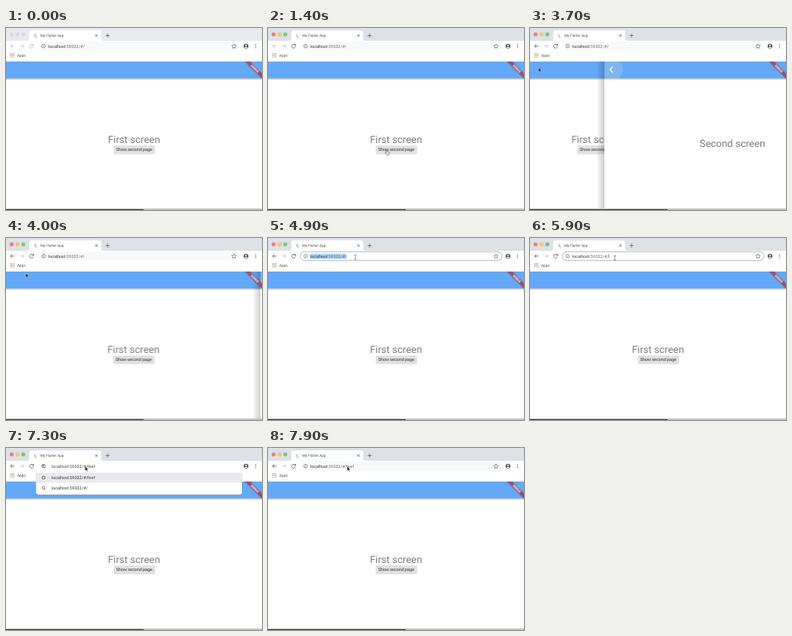
Animation, 320 px wide and 228 px high, one loop 8000 ms. Source, as an HTML page:

```html
<!DOCTYPE html>
<html lang="en">
<head>
<meta charset="utf-8">
<title>Browser navigation</title>
<style>
html, body { margin: 0; width: 100%; height: 100%; overflow: hidden; background: #fff; }
svg { display: block; width: 100vw; height: 100vh; }
text { font-family: Roboto, "Open Sans", sans-serif; font-size: 5.25px; fill: #333; white-space: pre; text-rendering: geometricPrecision; }
.small { font-size: 4.5px; fill: #4a4a4a; }
.big { font-size: 12.5px; fill: #7c7c7c; text-anchor: middle; }
.dim { fill: #686c70; }
.line { fill: none; stroke: #5f6368; stroke-width: .8; }
.thin { stroke-width: .6; }

/* Every part shares one 8 s clock; poses hold for 100 ms (1.25%). */
.strip, .lights, .back, .reload, .first, .second, .hover, .home, .detail, .typing, .done, .idle,
.ring, .sel, .caret, .popup, .pointer, .arrow, .hand, .beam, .spinA, .spinB, .k2, .k3, .k4 {
  animation: 8s step-end infinite;
}

.strip { animation-name: strip; }
@keyframes strip { 0% { fill: #e9eaee; } 13.75%, 100% { fill: #dee1e6; } }
.lights { animation-name: lights; }
@keyframes lights { 0% { opacity: 0; } 13.75%, 100% { opacity: 1; } }
.back { animation-name: back; }
@keyframes back { 0% { stroke: #c3c6c9; } 21.25%, 100% { stroke: #5f6368; } }
.reload { animation-name: reload; }
@keyframes reload { 0% { stroke: #b4b7ba; } 13.75%, 100% { stroke: #5f6368; } }

.home { animation-name: home; }
@keyframes home { 0%, 46.25% { opacity: 1; } 21.25%, 86.25%, 100% { opacity: 0; } }
.detail { animation-name: detail; }
@keyframes detail { 0%, 46.25%, 100% { opacity: 0; } 21.25% { opacity: 1; } }
.typing { animation-name: typing; }
@keyframes typing { 0%, 97.5%, 100% { opacity: 0; } 86.25% { opacity: 1; } }
.idle { animation-name: idle; }
@keyframes idle { 0%, 97.5%, 100% { opacity: 1; } 86.25% { opacity: 0; } }
.done { animation-name: done; }
@keyframes done { 0% { opacity: 0; } 97.5%, 100% { opacity: 1; } }
.k2 { animation-name: k2; }
@keyframes k2 { 0% { fill: transparent; } 88.75%, 100% { fill: #444; } }
.k3 { animation-name: k3; }
@keyframes k3 { 0% { fill: transparent; } 90%, 100% { fill: #444; } }
.k4 { animation-name: k4; }
@keyframes k4 { 0% { fill: transparent; } 91.25%, 100% { fill: #444; } }
.popup { animation-name: popup; }
@keyframes popup { 0%, 97.5%, 100% { opacity: 0; } 88.75% { opacity: 1; } }
.ring { animation-name: ring; }
@keyframes ring { 0%, 86.25%, 100% { opacity: 0; } 60% { opacity: 1; } }
.sel { animation-name: sel; }
@keyframes sel { 0%, 67.5%, 100% { opacity: 0; } 60% { opacity: 1; } }
.caret { animation-name: caret; }
@keyframes caret { 0%, 80%, 100% { opacity: 0; } 72.5% { opacity: 1; } }

/* Pushed page and the parallax of the page below it */
.second { animation-name: second; }
@keyframes second {
  0% { transform: translateX(345px); }
  21.25% { transform: translateX(2px); }
  22.5% { transform: translateX(1px); }
  23.75% { transform: none; }
  46.25% { transform: translateX(93px); }
  47.5% { transform: translateX(259px); }
  48.75% { transform: translateX(307px); }
  50% { transform: translateX(318px); }
  51.25%, 100% { transform: translateX(345px); }
}
.first { animation-name: first; }
@keyframes first {
  0% { transform: none; }
  21.25% { transform: translateX(-106.7px); }
  46.25% { transform: translateX(-75.7px); }
  47.5% { transform: translateX(-20.3px); }
  48.75% { transform: translateX(-4.3px); }
  50% { transform: translateX(-.7px); }
  51.25%, 100% { transform: none; }
}
.hover { animation-name: hover; }
@keyframes hover { 0% { opacity: 0; } 42.5%, 100% { opacity: .2; } }

.pointer { animation-name: pointer; }
@keyframes pointer {
  0% { transform: translate(-12px, 216px); }
  2.5% { transform: translate(1px, 216px); animation-timing-function: steps(7); }
  11.25% { transform: translate(155px, 150px); }
  12.5% { transform: translate(148px, 152.5px); }
  33.75% { transform: translate(148px, 152.5px); animation-timing-function: steps(8); }
  43.75% { transform: translate(10.7px, 49.5px); }
  48.75% { transform: translate(10.7px, 49.5px); animation-timing-function: steps(5); }
  55% { transform: translate(80px, 22px); animation-timing-function: steps(4); }
  60% { transform: translate(109.3px, 21px); }
  67.5% { transform: translate(109.3px, 21px); animation-timing-function: steps(2); }
  70% { transform: translate(113px, 21px); animation-timing-function: steps(6); }
  77.5%, 100% { transform: translate(99px, 23px); }
}
.arrow { animation-name: arrow; }
@keyframes arrow { 0%, 21.25%, 77.5%, 100% { opacity: 1; } 17.5%, 55% { opacity: 0; } }
.hand { animation-name: hand; }
@keyframes hand { 0%, 21.25%, 100% { opacity: 0; } 17.5% { opacity: 1; } }
.beam { animation-name: beam; }
@keyframes beam { 0%, 77.5%, 100% { opacity: 0; } 55% { opacity: 1; } }

.spinA { animation-name: spinA; }
@keyframes spinA { 0%, 48.75% { opacity: 1; } 17.5%, 86.25%, 100% { opacity: 0; } }
.spinB { animation-name: spinB; }
@keyframes spinB { 0%, 48.75% { opacity: 0; } 17.5%, 86.25%, 100% { opacity: 1; } }
</style>
</head>
<body>
<svg viewBox="0 0 320 228" preserveAspectRatio="none">
  <defs>
    <clipPath id="app"><rect y="42" width="320" height="184"/></clipPath>
    <linearGradient id="edge"><stop stop-opacity="0"/><stop offset="1" stop-opacity=".2"/></linearGradient>
    <linearGradient id="drop" x2="0" y2="1"><stop stop-opacity=".3"/><stop offset="1" stop-opacity="0"/></linearGradient>
    <g id="bar">
      <rect y="42" width="320" height="184" fill="#fff"/>
      <rect y="63" width="320" height="2.5" fill="url(#drop)"/>
      <rect y="42" width="320" height="21" fill="#63a9f8"/>
    </g>
  </defs>

  <rect width="320" height="228" fill="#fff"/>

  <!-- Tab strip -->
  <rect class="strip" width="320" height="16"/>
  <path d="M26 16Q29 16 29 13V6Q29 3 32 3H116Q119 3 119 6V13Q119 16 122 16Z" fill="#fff"/>
  <g fill="#dadbde"><circle cx="7" cy="8" r="2.5"/><circle cx="14.3" cy="8" r="2.5"/><circle cx="21.6" cy="8" r="2.5"/></g>
  <g class="lights">
    <circle cx="7" cy="8" r="2.5" fill="#f27d78"/><circle cx="14.3" cy="8" r="2.5" fill="#f3c56b"/><circle cx="21.6" cy="8" r="2.5" fill="#74c97c"/>
  </g>
  <path class="line thin spinA" d="M37.5 7.6Q34.6 8.2 36 10Q38.5 10.2 38 12"/>
  <path class="line thin spinB" d="M36 7.8V10.4Q36.2 12 38.3 12"/>
  <text class="small" x="43" y="11.3">My Flutter App</text>
  <path class="line" d="M111.5 8l3 3m0-3l-3 3M124.5 9.5h5M127 7v5"/>

  <!-- Toolbar -->
  <g class="line">
    <path class="back" d="M10.7 22.7H5.7M8 20.3L5.6 22.7L8 25.1"/>
    <path d="M17.5 22.7h5M20.2 20.3l2.4 2.4l-2.4 2.4" stroke="#c3c6c9"/>
    <path class="reload" d="M33.9 21.3A2.4 2.4 0 1 0 34.3 23.5M34.5 19.9V21.9H32.5"/>
  </g>
  <rect x="40.5" y="17.2" width="252" height="11" rx="5.5" fill="#f8f9fa"/>
  <rect class="line ring" x="40.5" y="17.2" width="252" height="11" rx="5.5" style="fill:#fff;stroke:#a3a9b3"/>
  <g class="idle">
    <circle class="line thin" cx="47" cy="22.7" r="2.3"/>
    <path class="line thin" d="M47 22.4v1.6M47 21.2v.6"/>
    <path class="line thin" d="M285 19.9l.8 1.9 2.1.2-1.6 1.4.5 2-1.8-1.1-1.8 1.1.5-2-1.6-1.4 2.1-.2z"/>
  </g>
  <g class="typing">
    <rect x="37" y="17" width="258.5" height="12" fill="#fff"/>
    <circle class="line" cx="47" cy="22.7" r="2.2"/>
    <path d="M45.2 21.5l1.8-.8.5 1.5-1.2 1zM47.2 23.2l1.6.2-1.2 1.4z" fill="#5f6368"/>
  </g>
  <rect class="sel" x="52.5" y="19.6" width="45.6" height="6.5" fill="#b0d3fa"/>
  <text class="home" x="53" y="24.6">localhost<tspan class="dim">:59332/#/</tspan></text>
  <text class="detail" x="53" y="24.6">localhost<tspan class="dim">:59332/#/second</tspan></text>
  <text class="typing" x="57" y="24.6" style="fill:#444">localhost:59332/#/f<tspan class="k2">e</tspan><tspan class="k3">e</tspan><tspan class="k4">f</tspan></text>
  <text class="done" x="53" y="24.6">localhost<tspan class="dim">:59332/#/feef</tspan></text>
  <path class="caret" d="M98.3 20v5.2" stroke="#333" stroke-width=".5"/>
  <circle cx="300" cy="22.7" r="3" fill="#55595e"/>
  <circle cx="300" cy="21.8" r="1" fill="#fff"/>
  <path d="M298.2 24.4Q300 22.8 301.8 24.4Q300 26 298.2 24.4Z" fill="#fff"/>
  <g fill="#5f6368"><circle cx="312" cy="20.7" r=".6"/><circle cx="312" cy="22.7" r=".6"/><circle cx="312" cy="24.7" r=".6"/></g>

  <!-- Bookmarks -->
  <g fill="none" stroke-width="1.3" stroke-dasharray="1.3 .7">
    <path d="M5.2 32.4h5.3" stroke="#c98f88"/><path d="M5.2 34.4h5.3" stroke="#8fa592"/><path d="M5.2 36.4h5.3" stroke="#cdb376"/>
  </g>
  <text x="14" y="36.3" style="font-size:4.7px;fill:#4a4a4a">Apps</text>

  <!-- App pages -->
  <g clip-path="url(#app)">
    <g class="first">
      <use href="#bar"/>
      <text class="big" x="160" y="144.2">First screen</text>
      <rect x="134.8" y="147.7" width="51.5" height="10.5" rx="1" fill="#000" opacity=".1"/>
      <rect x="134.8" y="147.2" width="51.5" height="10.3" rx="1" fill="#e1e1e1"/>
      <text x="160.3" y="154.2" text-anchor="middle" style="font-size:5.35px;fill:#2a2a2a">Show second page</text>
    </g>
    <g class="second">
      <rect x="-10" y="42" width="10" height="184" fill="url(#edge)"/>
      <svg width="320" height="228" overflow="hidden">
        <use href="#bar"/>
        <circle class="hover" cx="8" cy="52.3" r="15" fill="#e6ecd0" clip-path="url(#app)"/>
        <path d="M10.5 48.5L6.9 52.1L10.5 55.7" fill="none" stroke="#fff" stroke-width="1.3"/>
        <text class="big" x="160" y="149.3">Second screen</text>
      </svg>
    </g>
    <g transform="translate(320 42) rotate(45)">
      <rect x="-16" y="10.2" width="32" height="5.4" fill="#000" opacity=".15"/>
      <rect x="-16" y="10.5" width="32" height="4.5" fill="#98516f"/>
      <text y="14.1" text-anchor="middle" style="font-size:3.8px;font-weight:900;fill:#fff">DEBUG</text>
    </g>
  </g>

  <!-- Window bottom -->
  <rect y="226" width="320" height="2" fill="#c6c6c6"/>
  <rect y="227" width="172" height="1" fill="#3a3a3c"/>

  <!-- Suggestions -->
  <g class="popup">
    <rect x="37" y="29.5" width="258.5" height="30" rx="3" fill="#000" opacity=".15"/>
    <rect x="37.5" y="29" width="257.5" height="29.5" rx="3" fill="#fff"/>
    <rect x="37.5" y="31" width="257.5" height="12.5" fill="#e8eaed"/>
    <circle class="line" cx="47" cy="37.2" r="2"/>
    <text x="57" y="39.1">localhost:59332/#/f<tspan class="k2">e</tspan><tspan class="k3">e</tspan><tspan class="k4">f</tspan></text>
    <path class="line" d="M48.2 51.2l1.4 1.4M48.5 49.8a1.7 1.7 0 1 1-3.4 0a1.7 1.7 0 1 1 3.4 0"/>
    <text x="57" y="52.2">localhost:59332/#/</text>
  </g>

  <!-- Pointer -->
  <g class="pointer">
    <path class="arrow" d="M0 0V5.6L1.3 4.5L2.2 6.4L3.1 6L2.2 4.1H3.9Z" fill="#111" stroke="#fff" stroke-width=".4"/>
    <path class="hand" d="M-.4 .6Q.4 -.2 .9 .7L1.2 2.4L3 2.8Q3.6 3 3.4 4.2L2.9 6.2H.4L-1.3 3.9Q-1.2 3 -.2 3.6Z" fill="#fff" stroke="#222" stroke-width=".6"/>
    <path class="beam" d="M-1 0Q0 0 0 .7Q0 0 1 0M0 .5V5.5M-1 6Q0 6 0 5.3Q0 6 1 6" fill="none" stroke="#222" stroke-width=".5"/>
  </g>
</svg>
</body>
</html>
```
